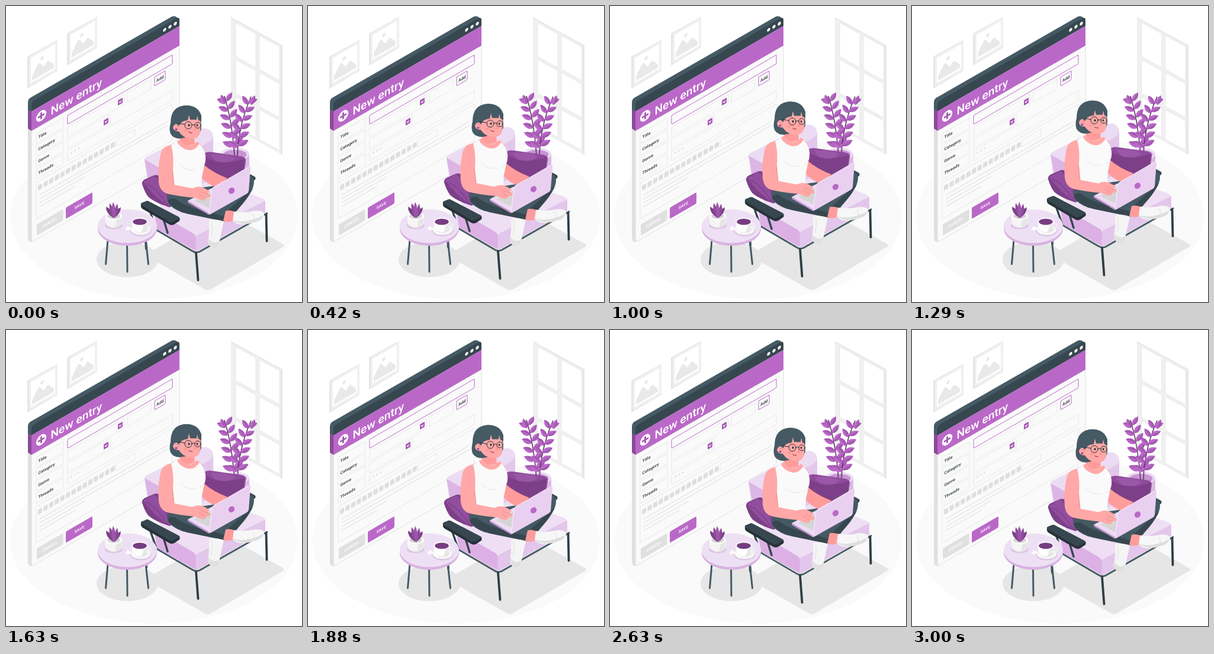
Animation, 500 px wide and 500 px high, one loop 3040 ms. Source, as an HTML page:

```html
<!DOCTYPE html>
<html lang="en">
<head>
<meta charset="utf-8">
<title>New entry</title>
<style>
html, body { margin: 0; width: 100%; height: 100%; overflow: hidden; background: #fff; }
svg { display: block; width: 100vw; height: 100vh; }
text { font-family: Roboto, Inter, sans-serif; font-weight: 500; }
.line { fill: none; stroke: #e3e3e3; stroke-width: .8; }
.dark { fill: none; stroke: #37474f; stroke-linecap: round; stroke-linejoin: round; }
.ink { fill: none; stroke: #263238; stroke-linecap: round; }
</style>
</head>
<body>
<svg viewBox="0 0 500 500">
<defs>
  <g id="picture">
    <path d="M-1-1 50 0V52L-1 53Z" fill="#e6e6e6"/>
    <path d="M2 1H50V51H2Z" fill="#f0f0f0"/>
    <path d="M5 5H46V47H5Z" fill="#fff"/>
    <path d="M7 44V37L17 22Q19 20 21 23L27 32 32 27Q34 25 36 28L44 38V44Z" fill="#e9e9e9"/>
    <circle cx="24" cy="16" r="3" fill="#e9e9e9"/>
  </g>
  <g id="check">
    <rect x="-4" y="-4.5" width="8" height="9" rx="1" fill="#a85bb6"/>
    <path d="M-2-1 0 1.5 2-1" fill="none" stroke="#fff" stroke-width="1.2"/>
  </g>
</defs>

<ellipse cx="250" cy="355.500" rx="243" ry="140.500" fill="#fafafa"/>
<use href="#picture" transform="matrix(1 -.577 0 1 37 86)"/>
<use href="#picture" transform="matrix(1 -.577 0 1 104 47)"/>
<g id="window" transform="matrix(1 .545 0 1 380 19)">
  <path d="M0 0H87V185H0Z" fill="#f0f0f0"/>
  <path d="M0 0H87V2H0ZM84 2H87V185H84Z" fill="#e6e6e6"/>
</g>

<!-- browser window -->
<path d="M37 207 43 210V399Q37 398 37 391Z" fill="#e0e0e0"/>
<path d="M37 174 43 177V211L37 207Z" fill="#8b4a97"/>
<path d="M37 175V163Q37 157 42 154.500L279 18.500Q283 16.500 287 18L291 21Q293 23 293 28L43 178Z" fill="#455a64"/>
<g id="screen" transform="matrix(1 -.577 0 1 43 178)">
  <path d="M0 33H250V217Q250 221 246 221H4Q0 221 0 217Z" fill="#fafafa" stroke="#e0e0e0"/>
  <path d="M0 0V-10Q0-16 6-16H244Q250-16 250-10V0Z" fill="#37474f"/>
  <path d="M0 0H250V33H0Z" fill="#ba68c8"/>
  <g fill="#fff"><circle cx="225" cy="-8" r="2.700"/><circle cx="234" cy="-8" r="2.700"/><circle cx="243" cy="-8" r="2.700"/></g>
  <circle cx="16.500" cy="17" r="8.600" fill="#fff"/>
  <path d="M16.500 11.500V22.500M11 17H22" stroke="#a65bb3" stroke-width="3"/>
  <text x="32.500" y="25.500" font-size="19.200" fill="#fff">New entry</text>
  <g id="form"></g>
  <rect x="61" y="42" width="177" height="15" rx="1.500" fill="#fafafa" stroke="#ba68c8"/>
  <rect class="line" x="61" y="62" width="96" height="16.500" rx="1.500"/>
  <rect class="line" x="162" y="62" width="40" height="16.500" rx="1.500"/>
  <rect x="208" y="62" width="18" height="15" rx="1.500" fill="#fafafa" stroke="#ba68c8"/>
  <text x="211" y="72.500" font-size="7" fill="#263238">Add</text>
  <rect class="line" x="61" y="82" width="72" height="16.500" rx="1.500"/>
  <rect class="line" x="61" y="102" width="177" height="17" rx="1.500"/>
  <use href="#check" x="150" y="70"/><use href="#check" x="126" y="90"/>
  <g fill="#dcdcdc"><circle cx="67.500" cy="108.500" r="1.400"/><circle cx="73.500" cy="108.500" r="1.400"/><circle cx="79.500" cy="108.500" r="1.400"/></g>
  <rect class="line" x="8" y="125" width="230" height="61" rx="1.500"/>
  <rect class="line" x="143" y="131" width="32" height="11" rx="1.500"/>
  <path d="M14 149.500H230M14 156H230M14 162.500H90M14 169H74" stroke="#e0e0e0" stroke-width="1.200"/>
  <rect x="9" y="196" width="44.500" height="19" rx="2" fill="#e0e0e0"/>
  <rect x="58" y="196" width="45" height="19" rx="2" fill="#ba68c8"/>
  <g font-size="6.800" fill="#fff" text-anchor="middle"><text x="31" y="207.700">CANCEL</text><text x="81" y="207.700">SAVE</text></g>
</g>

<!-- floor shadows -->
<path d="M240 418 365 345 468 402Q472 405 468 407L347 478Q341 482 335 478L240 424Z" fill="#e6e6e6"/>
<ellipse cx="205" cy="428" rx="52" ry="30" fill="#e6e6e6"/>

<!-- tall plant -->
<path d="M363 250V272Q387 290 411 272V250Z" fill="#dcb9e4"/>
<ellipse cx="387" cy="250" rx="24" ry="10.500" fill="#ecdcf3"/>
<ellipse cx="387" cy="251" rx="19.500" ry="8" fill="#c795d2"/>
<g id="plant"></g>

<g id="float">
  <!-- chair -->
  <path class="dark" d="M235 384 237 410" stroke-width="4"/>
  <path d="M234 260Q234 257 237 255L324 210Q334 205 342 208 350 212 350 221V300L262 340 240 305Z" fill="#ecdcf3"/>
  <path d="M234 259 262 275 270 312 241 297Z" fill="#dcb5e5"/>
  <path d="M262 274 340 231Q348 227 350 221V300L270 312Z" fill="#e3c7eb"/>
  <path class="dark" d="M392 277 418 291" stroke-width="7"/>
  <path d="M332 251Q338 245 349 247L398 254Q406 256 405 262L401 288Q380 308 335 291Z" fill="#8f4b9b"/>
  <path d="M337 255Q366 271 403 258L401 288Q375 303 335 290Z" fill="#7d4088"/>
  <path d="M345 251Q372 248 388 257 377 268 354 262Z" fill="#9a57a6"/>
  <path d="M248 347 345 292 433 325Q438 328 438 332L437 348 325 411Q320 413 316 411L255 375Z" fill="#eedff4"/>
  <path d="M250 346 316 384Q321 387 321 393V414L255 377Z" fill="#dcb0e4"/>
  <path d="M321 390Q322 387 327 385L438 329V349L325 413 320 414Z" fill="#e3c6eb"/>
  <path class="dark" d="M245 373 315 414Q321 418 327 415L441 350" stroke-width="2.800" style="stroke:#455a64"/>
  <path class="dark" d="M321 417 324.500 463M439.500 352 440.500 397" stroke-width="3.800" style="stroke:#2f3d44"/>
  <path d="M230 301Q229 296 234 293L250 286Q260 283 270 296L284 325Q285 338 276 340L262 335Q246 328 240 322 234 314 230 301Z" fill="#7d4088"/>
  <path d="M232 297 250 287Q263 295 270 317L276 339Q251 324 232 297Z" fill="#924e9e"/>
  <path d="M237 300Q254 307 274 338" fill="none" stroke="#6b3675"/>

  <!-- legs and feet -->
  <path d="M280 314Q270 320 273 331 279 342 298 349L344 357 369 364 390 346 415 312Q421 299 418 291 414 285 403 288L350 304Z" fill="#455a64"/>
  <path d="M275 333Q286 345 306 351L369 364 372 356 337 347Q300 338 285 325 270 324 275 333Z" fill="#37474f"/>
  <path d="M374 346 417 307Q410 325 388 347Z" fill="#37474f"/>
  <path d="M371 346Q379 344 387 348L386 361Q377 368 367 363Z" fill="#ff9c9b"/>
  <path d="M385 347Q403 350 420 346 432 345 436 350 437 358 428 362 413 369 397 369 387 368 383 362Z" fill="#f7f7f7"/>
  <path d="M384 362Q405 368 434 354 434 361 424 364 400 373 383 362Z" fill="#dedede"/>
  <path d="M343 362Q352 359 368 364 364 381 361 396 359 408 351 409 342 407 341 397 344 382 343 362Z" fill="#f5f5f5"/>
  <path d="M341 391Q350 405 361 396 359 409 351 409 342 408 341 391Z" fill="#e0e0e0"/>
  <path d="M347 364Q350 377 346 390M416 350Q421 354 419 362" fill="none" stroke="#dedede"/>

  <!-- torso and arms -->
  <path d="M322 231Q332 233 335 246L334 268Q350 282 374 291L356 306Q340 302 328 287Z" fill="#ff9c9b"/>
  <path d="M288 229Q301 224 322 230 332 235 336 248 339 259 335 269L331 288 330 307Q309 322 281 315L276 275 276 238Z" fill="#fafafa"/>
  <path d="M295 211 294 227Q302 242 319 232L318 222Z" fill="#ff9c9b"/>
  <path d="M293 226Q307 245 322 229L327 232Q317 249 301 241 291 236 289 229Z" fill="#ffa8a7"/>
  <path d="M293 266Q300 279 320 277M327 275Q334 272 335 266" fill="none" stroke="#e6e6e6"/>

  <!-- head -->
  <path d="M278 198Q278 169 304 168 324 168 329 184L330 208 325 219 304 222 294 224Q283 224 278 216 275 208 278 198Z" fill="#455a64"/>
  <path d="M291 183Q309 177 327 187L329 200 328 212Q326 224 315 224 302 224 295 216L292 212Q283 212 282 205 283 197 292 199Z" fill="#ffa8a7"/>
  <path d="M280 192Q283 169 304 168 324 168 330 185L330 195 325 193 323 185 322 192 311 192 309 184 307 193Q298 194 295 198L292 203Q287 195 282 204Z" fill="#455a64"/>
  <path d="M286 203Q290 200 291 207" fill="none" stroke="#ee7f7e"/>
  <circle cx="287.500" cy="208.500" r="2" fill="#9c4fac"/>
  <g class="ink" stroke-width="1">
    <circle cx="308" cy="201.500" r="6"/><circle cx="324" cy="201.500" r="5"/>
    <path d="M314 201Q316 199 319 201M302 200 291 198"/>
  </g>
  <g fill="#263238"><ellipse cx="309" cy="201.500" rx="1.500" ry="2"/><ellipse cx="323" cy="201.500" rx="1.300" ry="1.900"/></g>
  <path d="M318 202 320 209 317 210" fill="none" stroke="#ee7f7e"/>
  <path d="M308.500 212.500Q311 215 315 214" fill="none" stroke="#b23b4a" stroke-width="1.200"/>
  <ellipse cx="303" cy="210" rx="3.200" ry="1.800" fill="#ff9696"/>

  <!-- laptop -->
  <path d="M307 329 347 308 361 315 343 352Z" fill="#ecdcf3"/>
  <path d="M307 329 343 350V353L307 332Z" fill="#c996d4"/>
  <path d="M318 329 347 314 344 342Z" fill="#d5d5d5"/>
  <path d="M279 235Q262 236 260 256 256 276 258 298 260 313 272 317 294 322 319 324L330 328Q338 330 337 325L346 322Q347 319 340 317L344 314Q340 309 331 306 322 304 315 308L284 302 282 277Q284 252 279 235Z" fill="#ffa8a7"/>
  <path d="M284 302 281 277M326 317 337 324M329 314 343 319" fill="none" stroke="#f08b8a"/>
  <path d="M351 306 410 272Q414 270 413 275L410 312Q410 315 407 317L345 352Q342 353 343 349L348 311Q348 308 351 306Z" fill="#e9d0f0"/>
  <path d="M343 350 348 311Q348 308 351 306L410 272" fill="none" stroke="#f5eaf8" stroke-width="1.300"/>
  <ellipse cx="381" cy="312" rx="5.500" ry="4.800" transform="rotate(-45 381 312)" fill="#ba68c8"/>

  <!-- near armrest -->
  <path class="dark" d="M243 346 253 375M266 360 273 383" stroke-width="3.500"/>
  <path d="M228 336Q227 333 231 332L236 330Q239 328 243 331L291 356Q295 358 293 363L284 369Q280 371 276 369L231 343Q227 340 228 336Z" fill="#263238"/>
  <path d="M228 336Q227 333 231 332L236 330Q239 328 243 331L291 356Q295 358 291 360L283 364Q279 366 275 364Z" fill="#37474f"/>
</g>

<!-- side table -->
<path class="dark" d="M172 395 168.500 436M204.500 402 205 449M236 395 240.500 436" stroke-width="3" style="stroke:#455a64"/>
<ellipse cx="205" cy="376" rx="50" ry="29" fill="#d9b2e2"/>
<ellipse cx="205" cy="372" rx="50" ry="28.500" fill="#eee0f4"/>
<ellipse cx="182" cy="371" rx="15" ry="6" fill="#dec6e6"/>
<path d="M168 355Q167 367 171 371 182 378 193 371 197 367 196 355Z" fill="#f5f5f5"/>
<path d="M184 375Q193 374 195 366L196 355 187 360Z" fill="#e6e6e6"/>
<ellipse cx="182" cy="355" rx="14" ry="6.500" fill="#fff"/>
<ellipse cx="182" cy="355" rx="11" ry="4.500" fill="#d4d4d4"/>
<g fill="#7d4088">
  <path d="M181 358Q168 349 169 339 180 344 182 356Z"/><path d="M183 358Q194 350 194 340 184 344 182 356Z"/>
</g>
<path d="M180 357Q173 344 175 333 182 340 183 356ZM182 357Q182 343 188 334 192 347 185 356Z" fill="#8f4b9b"/>
<path d="M182 358Q176 343 181 331 187 342 184 357Z" fill="#9c57a8"/>
<g transform="translate(1.500 0)">
  <ellipse cx="226" cy="379" rx="18" ry="10" fill="#d8c1df"/>
  <ellipse cx="226" cy="377.500" rx="17" ry="9.500" fill="#f5f5f5"/>
  <ellipse cx="226" cy="377" rx="11" ry="5.500" fill="#dedede"/>
  <circle cx="239.500" cy="371" r="3.500" fill="none" stroke="#f0f0f0" stroke-width="2"/>
  <path d="M211 364Q211 382 225 382 238 381 238 364Z" fill="#fff"/>
  <path d="M227 382Q238 380 238 364L232 369Z" fill="#e9e9e9"/>
  <ellipse cx="224.500" cy="364" rx="13.500" ry="6.500" fill="#fff"/>
  <ellipse cx="224.500" cy="364.500" rx="11.800" ry="5.200" fill="#763d81"/>
  <path d="M203 373Q207 374 213 380L217 383" fill="none" stroke="#fff" stroke-width="2" stroke-linecap="round"/>
  <ellipse cx="204" cy="376.500" rx="3.500" ry="2" fill="#fff"/>
</g>
</svg>
<script>
const $ = id => document.getElementById(id);
const add = (id, markup) => $(id).insertAdjacentHTML('beforeend', markup);

for (let row = 0; row < 3; row++)
  for (const x of [8, 48])
    add('window', `<rect x="${x}" y="${5 + row * 62.5}" width="34" height="${row < 2 ? 57 : 50}" fill="#fff" stroke="#e6e6e6" stroke-width=".7"/>`);

['Title', 'Category', 'Genre', 'Threads'].forEach((label, i) => {
  const y = 42 + i * 20.2;
  add('form', `<rect class="line" x="8" y="${y}" width="46" height="17" rx="1.5"/>
    <text x="11.5" y="${y + 11}" font-size="7" fill="#263238">${label}</text>`);
});
for (let i = 0; i < 14; i++)
  add('form', `<rect x="${11 + i * 9.45}" y="132" width="7" height="8.5" rx="1" fill="#dedede"/>`);

const leaf = (x, y, angle, size) => `<g transform="translate(${x} ${y}) rotate(${angle}) scale(${size})">
  <path d="M0 0C4-6 11-6 18-1 12 5 5 5 0 0" fill="#ba68c8"/>
  <path d="M0 0 18-1C12 5 5 5 0 0" fill="#a45ab1"/></g>`;

// Leaves sit in pairs along a quadratic stem.
function branch([ax, ay], [bx, by], [cx, cy]) {
  add('plant', `<path d="M${ax} ${ay}Q${bx} ${by} ${cx} ${cy}" fill="none" stroke="#5f3468" stroke-width="1.6"/>`);
  for (let i = 0; i < 6; i++) {
    const t = .14 + i * .145, s = 1 - t;
    const x = s * s * ax + 2 * s * t * bx + t * t * cx;
    const y = s * s * ay + 2 * s * t * by + t * t * cy;
    const dir = Math.atan2(s * (by - ay) + t * (cy - by), s * (bx - ax) + t * (cx - bx)) * 180 / Math.PI;
    const size = 1.12 - i * .03;
    add('plant', leaf(x, y, dir - 60 + i * 2, size) + leaf(x, y - 3, dir + 60 - i * 2, size));
  }
  add('plant', leaf(cx, cy + 14, Math.atan2(cy - by, cx - bx) * 180 / Math.PI, .95));
}
branch([386, 253], [382, 195], [369, 152]);
branch([391, 253], [392, 203], [414, 153]);

const PERIOD = 3040, RISE = 9.8;
function draw(now) {
  const p = now % PERIOD / PERIOD;
  const y = -RISE * (1 - Math.abs(1 - 2 * p));
  $('float').setAttribute('transform', `translate(0 ${y.toFixed(2)})`);
  requestAnimationFrame(draw);
}
draw(0);
</script>
</body>
</html>
```
